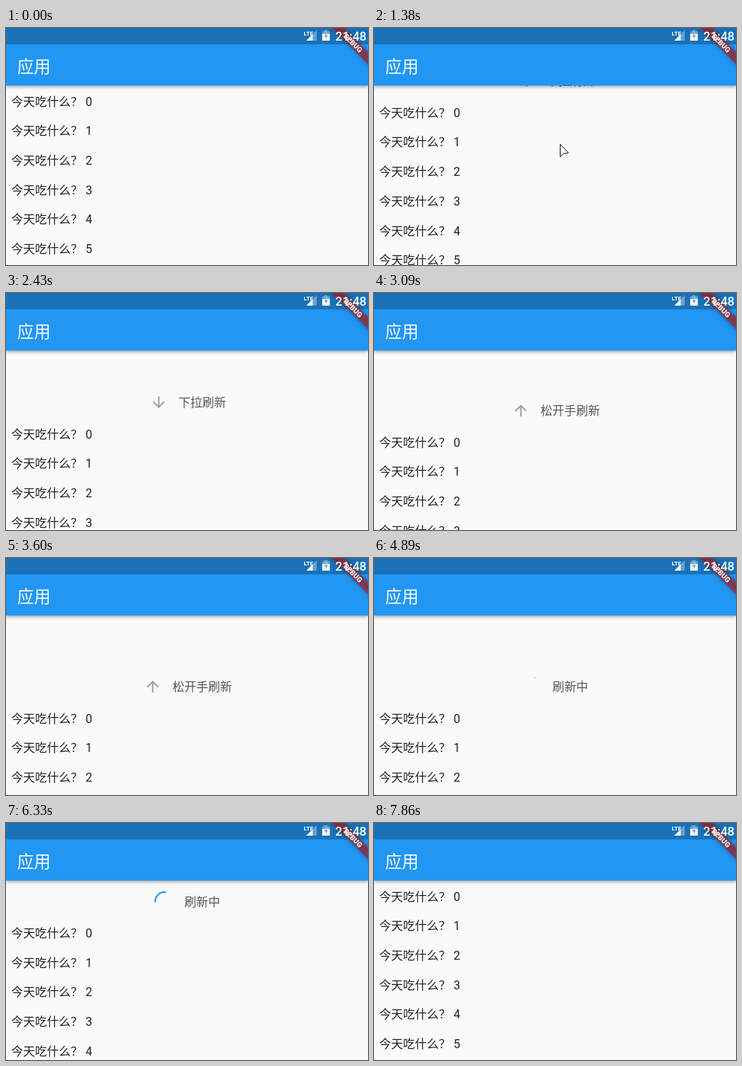
An HTML page that plays this animation: 487x319 px, repeating every 9330 ms.

```html
<!DOCTYPE html>
<html lang="zh-CN">
<head>
<meta charset="utf-8">
<title>下拉刷新</title>
<style>
  html, body { margin: 0; width: 100%; height: 100%; overflow: hidden; background: #fafafa; }
  svg { display: block; width: 487px; height: 319px; }
  text { font: 16px Roboto, "Noto Sans CJK SC", "Noto Sans CJK", sans-serif; white-space: pre; }
  #bar { filter: drop-shadow(0 2px 2px rgba(0, 0, 0, .32)); }
  #label { fill: #555; text-anchor: middle; }
  #banner rect { filter: drop-shadow(0 0 3px rgba(0, 0, 0, .5)); }
</style>
</head>
<body>
<svg viewBox="0 0 487 319">
  <rect width="487" height="319" fill="#fafafa"/>
  <g id="list" fill="#212121"></g>
  <g id="header">
    <path id="icon" fill="#9e9e9e"/>
    <circle id="spinner" r="12.6" fill="none" stroke="#2196f3" stroke-width="2" pathLength="360"/>
    <text id="label" x="264" y="62"></text>
  </g>
  <rect id="bar" width="487" height="77.5" fill="#2196f3"/>
  <rect width="487" height="22" fill="#1971b6"/>
  <text x="15" y="59.5" fill="#fff" style="font-size:22.5px">应用</text>
  <g id="banner" transform="translate(466.8 20.2) rotate(45)">
    <rect x="-50" y="-5.8" width="100" height="11.6" fill="#b71c1c" fill-opacity=".63"/>
    <text y="3.4" fill="#fff" text-anchor="middle" style="font-size:9.7px;font-weight:900">DEBUG</text>
  </g>
  <g fill="#fff">
    <path d="M404 17L418 3V17Z" opacity=".35"/>
    <path d="M404 17L412.5 8.5V17Z"/>
    <text x="400.5" y="9.5" style="font-size:8px;font-weight:700" textLength="">LTE</text>
    <path d="M428.5 4.5V3H432.5V4.5H435.5V17H425.5V4.5Z" opacity=".4"/>
    <path fill-rule="evenodd" d="M425.5 8H435.5V17H425.5ZM431.3 6L428 11.5H430V15L433.2 9.8H431.3Z"/>
    <text x="443" y="16.5" style="font-size:16.5px;font-weight:500">21:48</text>
  </g>
  <path id="cursor" d="M.5 .5V17.5L4.6 13.2L11.5 12Z" fill="#fff" stroke="#111"/>
</svg>
<script>
const $ = id => document.getElementById(id);
const LOOP = 9330, STEP = 30, REST = 49.5;
const RELEASE = 4843, REFRESHING = 4890, DONE = 6810, CLOSE = 7560;

const ICONS = {
  down: 'M20 12l-1.41-1.41L13 16.17V4h-2v12.17l-5.58-5.59L4 12l8 8 8-8z',
  up: 'M4 12l1.41 1.41L11 7.83V20h2V7.83l5.58 5.59L20 12l-8-8-8 8z',
  done: 'M9 16.17L4.83 12l-1.42 1.41L9 19 21 7l-1.41-1.41z'
};

// Pull distance while dragging: [time, pixels]
const DRAG = [[1080, 0], [1380, 15.3], [2040, 74], [2430, 91], [3000, 99.5],
  [3600, 117], [3960, 127], [4320, 127], [4350, 128]];

$('list').innerHTML = Array.from({ length: 6 }, (_, i) =>
  `<text x="7" y="${104.5 + i * 39.7}">今天吃什么？ ${i}</text>`).join('');

const clamp = x => Math.min(1, Math.max(0, x));

function along(points, t) {
  if (t <= points[0][0]) return points[0][1];
  for (let i = 1; i < points.length; i++) {
    const [t0, v0] = points[i - 1], [t1, v1] = points[i];
    if (t < t1) return v0 + (v1 - v0) * (t - t0) / (t1 - t0);
  }
  return points[points.length - 1][1];
}

// Slightly overdamped spring, from 1 to 0
const spring = s => (22.04 * Math.exp(-9.07 * s) - 9.07 * Math.exp(-22.04 * s)) / 12.97;

// cubic-bezier(.4, 0, .2, 1)
function ease(x) {
  let lo = 0, hi = 1;
  for (let i = 0; i < 20; i++) {
    const s = (lo + hi) / 2, r = 1 - s;
    if (1.2 * r * r * s + .6 * r * s * s + s ** 3 < x) lo = s; else hi = s;
  }
  return lo * lo * (3 - 2 * lo);
}

function pull(t) {
  if (t < REFRESHING) return along(DRAG, t);
  if (t < CLOSE) return REST + (128 - REST) * spring((t - RELEASE) / 1000);
  return REST * (1 - clamp((t - CLOSE) / 300));
}

function drawHeader(t, d) {
  const [text, icon] = t >= DONE ? ['刷新完成', 'done']
    : t >= REFRESHING ? ['刷新中', '']
    : d > 95 ? ['松开手刷新', 'up'] : ['下拉刷新', 'down'];
  const x = 237.5 - 8 * text.length;
  $('header').setAttribute('transform', `translate(0 ${d})`);
  $('label').textContent = text;
  $('icon').setAttribute('d', ICONS[icon] || '');
  $('icon').setAttribute('transform', `translate(${x - 12} 44)`);
  $('spinner').style.display = icon ? 'none' : '';
  if (icon) return;
  const turns = (t - RELEASE) / 1287, step = Math.floor(turns), phase = turns - step;
  const head = ease(clamp(phase * 2)), tail = ease(clamp(phase * 2 - 1));
  const start = -90 + 270 * tail + 306 * phase - 144 * step;
  $('spinner').setAttribute('transform', `translate(${x - .2} 56) rotate(${start})`);
  $('spinner').setAttribute('stroke-dasharray', `${Math.max(270 * (head - tail), .1)} 360`);
}

function drawCursor(t, d) {
  let x, y;
  if (t < 810) {
    const u = clamp((t - 390) / 420), r = 1 - u;
    x = 454 * r * r + 2 * 330 * u * r + 248 * u * u;
    y = 92 * r * r + 2 * 195 * u * r + 125 * u * u;
  } else {
    // The list lags behind the pointer the further it is pulled
    y = 126 + (1 / (1 - d / 780) - 1) * 1500;
    x = y < 158 ? 248 + 2 * (y - 126) / 32 : 250 - 15 * ((y - 158) / 160) ** 2;
  }
  $('cursor').style.display = t >= 390 && t < REFRESHING ? '' : 'none';
  $('cursor').setAttribute('transform', `translate(${Math.round(x)} ${Math.round(y)})`);
}

function frame(now) {
  const t = Math.floor(now % LOOP / STEP) * STEP, d = pull(t);
  $('list').setAttribute('transform', `translate(0 ${d})`);
  drawHeader(t, d);
  drawCursor(t, d);
  requestAnimationFrame(frame);
}
frame(0);
</script>
</body>
</html>
```
